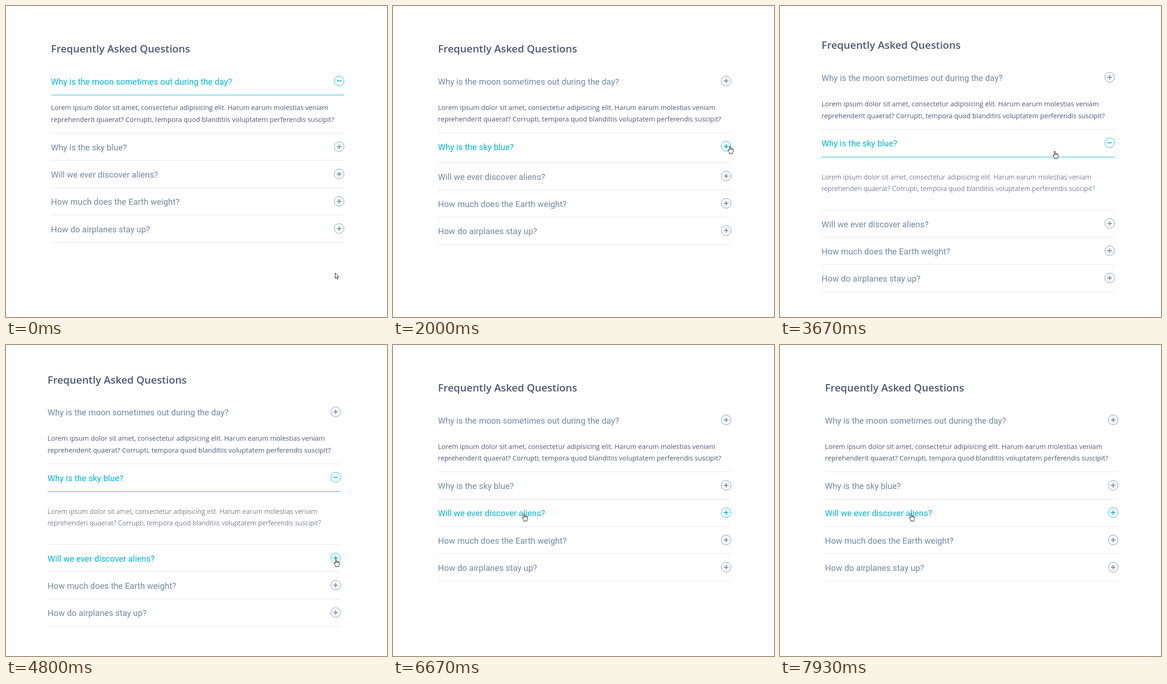
Animation, 828 px wide and 676 px high, one loop 8000 ms. Source, as an HTML page:

```html
<!DOCTYPE html>
<html lang="en">
<head>
<meta charset="utf-8">
<title>Frequently Asked Questions</title>
<style>
  html, body { margin: 0; width: 100%; height: 100%; overflow: hidden; background: #fff; }
  #stage { display: block; width: 828px; height: 676px; }
  text { font-family: "Open Sans", "Noto Sans", sans-serif; fill: #4d5974; white-space: pre; }
  .heading { font-size: 22.4px; font-weight: 600; }
  .lead { font-size: 14.62px; }
  .panel { overflow: hidden; }
  .panel text { font-size: 14.8px; font-weight: 300; fill: #36425e; }
  .row { color: #7288a2; }
  .row.lit { color: #03b5d2; }
  .row text { font-family: Roboto, sans-serif; font-size: 18.45px; fill: currentColor; }
  .row circle { fill: none; stroke: currentColor; stroke-width: .95; }
  .row path { stroke: currentColor; stroke-width: 1.9; }
  .rule { fill: #e5e5e5; }
  .accent { fill: #03b5d2; }
  .cursor { fill: #fff; stroke: #111; stroke-width: 1; stroke-linejoin: round; }
</style>
</head>
<body>
<svg id="stage" viewBox="0 0 828 676"></svg>
<script>
const LOOP = 8000, SLIDE = 200;
const LEFT = 97.8, WIDTH = 637, BAR_SHIFT = -7.5;
const PITCH = 59.3, PANEL = 115.2, BORDER = 0.8;
const FIRST_TOP = 133, SECOND_TOP = 275.3, LOWEST = 611, SCROLL = 17.5;

const questions = [
  "Why is the moon sometimes out during the day?",
  "Why is the sky blue?",
  "Will we ever discover aliens?",
  "How much does the Earth weight?",
  "How do airplanes stay up?"
];
const opener = "Lorem ipsum dolor sit amet, consectetur adipisicing elit. Harum earum molestias veniam";
const closer = word => `${word} quaerat? Corrupti, tempora quod blanditiis voluptatem perferendis suscipit?`;
const answers = { 1: closer("reprehenderi"), 2: closer("reprehenderit") };

// Clicks that open and close a row.
const visits = [
  { row: 0, from: -LOOP, to: 1850 },
  { row: 1, from: 1850, to: 1930 },
  { row: 1, from: 2720, to: 5842 },
  { row: 2, from: 6900, to: 7700 }
];

const home = { x: 715, y: 580 };
const moves = [
  { from: 20, to: 660, x: 384, y: 169 },
  { from: 960, to: 1330, x: 775, y: 302 },
  { from: 1430, to: 1530, x: 732, y: 304 },
  { from: 3150, to: 3330, x: 597, y: 315 },
  { from: 4080, to: 4530, x: 717, y: 465 },
  { from: 5020, to: 5800, x: 707, y: 297 },
  { from: 5930, to: 6330, x: 285, y: 366 }
];

const clamp = p => Math.min(1, Math.max(0, p));
const smooth = p => p * p * (3 - 2 * p);
const progress = (t, from, to) => clamp((t - from) / (to - from));

// Each move bends: sideways motion runs ahead of vertical motion.
function pointerAt(t) {
  let { x, y } = home;
  for (const move of moves) {
    const p = progress(t, move.from, move.to);
    x += (move.x - x) * smooth(p);
    y += (move.y - y) * smooth(p * p);
  }
  return { x, y };
}

const isActive = (row, t) => visits.some(v => v.row === row && t >= v.from && t < v.to);

// A panel slides open, and back from wherever it got to.
function openShare(row, t) {
  if (!answers[row]) return 0;
  return Math.max(...visits.filter(v => v.row === row).map(v => {
    const reached = clamp((Math.min(t, v.to) - v.from) / SLIDE);
    return clamp(reached - Math.max(0, t - v.to) / SLIDE);
  }));
}

const scrollAt = t => t < 6500 ? SCROLL * smooth(progress(t, 3500, 3870)) : 0;

const stage = document.getElementById("stage");
const line = name => `<rect class="${name}" width="${WIDTH}" height="1"/>`;

stage.innerHTML = `
  <g id="page">
    <text class="heading" y="101">Frequently Asked Questions</text>
    <g id="lead">
      <text class="lead" y="225.7">${opener}</text>
      <text class="lead" y="251.3">${closer("reprehenderit")}</text>
    </g>
    ${questions.map((question, i) => `
      <g class="row">
        <text y="37.8">${question}</text>
        <g transform="translate(626.2 29.8)">
          <circle r="10.6"/><path d="M-5 0H5"/><path class="upright" d="M0 -5V5"/>
        </g>
      </g>
      ${line("accent")}
      <svg class="panel" width="${WIDTH}" height="0">
        ${answers[i] ? `<text y="49">${opener}</text><text y="74.6">${answers[i]}</text>` : ""}
      </svg>
      ${line("rule")}`).join("")}
  </g>
  <g class="cursor">
    <path id="arrow" d="M.5 0V12.2L3.2 9.7L5 13.8L6.8 13L5 9H8.6Z"/>
    <g id="hand">
      <path d="M-1.2 1.2Q0 -.6 1.2 1.2V5.3Q2.4 4.5 3.3 5.8Q4.6 5.1 5.4 6.5Q6.8 6 7.5 7.5V11.2Q7.2 13.5 6.1 14.8V16.8H-.8V15Q-2.8 12.3 -4 9.7Q-3.9 7.7 -2.2 8.8L-1.2 10Z"/>
      <path d="M1.2 5.3V8.5M3.3 5.8V8.7M5.4 6.5V9" fill="none"/>
    </g>
  </g>`;

const all = name => [...stage.querySelectorAll(name)];
const [page, lead, arrow, hand] = ["page", "lead", "arrow", "hand"].map(id => document.getElementById(id));
const [cursor] = all(".cursor");
const rows = all(".row"), uprights = all(".upright"), accents = all(".accent");
const panels = all(".panel"), rules = all(".rule");

const place = (node, x, y) => node.setAttribute("transform", `translate(${x} ${y})`);
const show = (node, on) => node.setAttribute("visibility", on ? "visible" : "hidden");

function draw(t) {
  const active = questions.map((_, i) => isActive(i, t));
  const open = questions.map((_, i) => openShare(i, t));
  const border = active.map(on => on ? BORDER : 0);

  // Row tops on the unscrolled page; the last entry is the closing rule.
  const tops = [FIRST_TOP, SECOND_TOP + border[0]];
  for (let i = 1; i < questions.length; i++)
    tops.push(tops[i] + PITCH + border[i] + open[i] * PANEL);

  const excess = Math.max(0, tops[questions.length] - LOWEST);
  const scroll = Math.min(excess, scrollAt(t));
  const left = LEFT + (excess > 0 ? BAR_SHIFT : 0);
  const crisp = y => Math.round(y - scroll) + scroll;

  const { x, y } = pointerAt(t);
  const inside = x >= left && x <= left + WIDTH;
  let pointing = false;

  place(page, left, -scroll);
  place(lead, 0, border[0]);

  rows.forEach((row, i) => {
    const top = tops[i], offset = y + scroll - top;
    const hovered = inside && offset > 0 && offset < PITCH;
    pointing = pointing || hovered;
    place(row, 0, top);
    row.classList.toggle("lit", hovered || active[i]);
    show(uprights[i], !active[i]);
    show(accents[i], active[i]);
    accents[i].setAttribute("y", crisp(top + PITCH + BORDER));
    panels[i].setAttribute("y", top + PITCH + border[i]);
    panels[i].setAttribute("height", open[i] * PANEL);
    panels[i].setAttribute("opacity", open[i]);
    show(panels[i], open[i] > 0);
    rules[i].setAttribute("y", crisp(tops[i + 1]));
  });

  place(cursor, x, y);
  show(hand, pointing);
  show(arrow, !pointing);
}

const start = performance.now();
function frame() {
  draw((performance.now() - start) % LOOP);
  requestAnimationFrame(frame);
}
frame();
</script>
</body>
</html>
```
